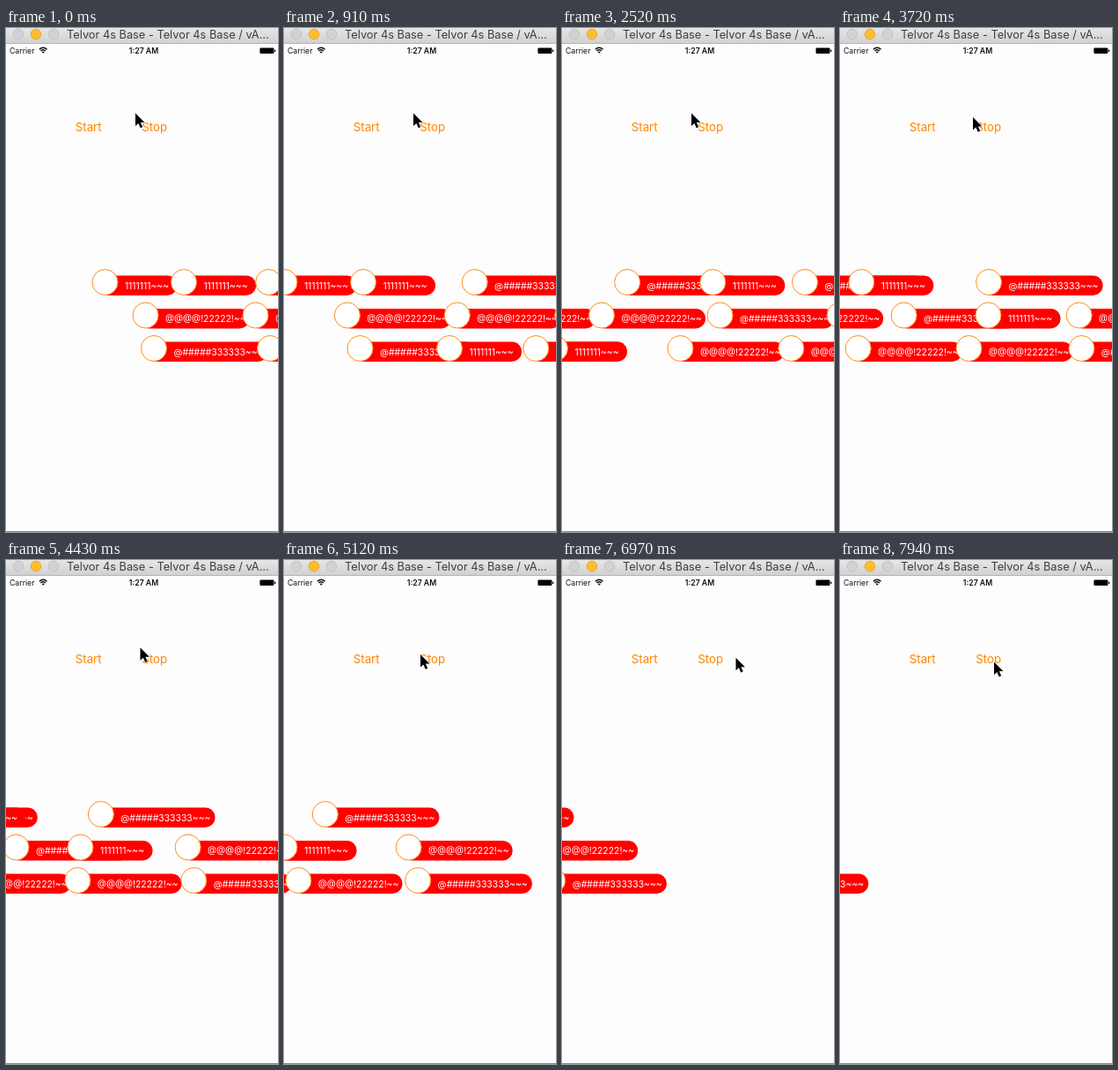
Write an HTML page that moves like this. It is 309 px wide and 571 px high and loops after 8 s.

```html
<!DOCTYPE html>
<html lang="en">
<head>
<meta charset="utf-8">
<title>Bullet comments</title>
<style>
  html, body { margin: 0; width: 100%; height: 100%; overflow: hidden; background: #fdfdfd; }
  svg { display: block; width: 309px; height: 571px; font-family: Inter, Roboto, sans-serif; }
  .button { font-size: 13.3px; fill: #ff8500; }
  .status { font-size: 8.7px; fill: #111; }
  .label { font-size: 10.4px; fill: #fff; }
</style>
</head>
<body>
<svg id="stage" viewBox="0 0 309 571">
  <defs>
    <linearGradient id="bar" x2="0" y2="1">
      <stop stop-color="#e6e6e6"/><stop offset="1" stop-color="#d1d1d1"/>
    </linearGradient>
  </defs>
  <rect width="309" height="571" fill="#fdfdfd"/>

  <!-- Window title bar -->
  <rect width="309" height="17" fill="url(#bar)"/>
  <rect y="17" width="309" height="1" fill="#b4b4b4"/>
  <g stroke-width=".8">
    <circle cx="14" cy="7" r="5.8" fill="#d2d2d2" stroke="#bdbdbd"/>
    <circle cx="34" cy="7" r="5.8" fill="#ffbd2e" stroke="#e2a02a"/>
    <circle cx="54" cy="7" r="5.8" fill="#d2d2d2" stroke="#bdbdbd"/>
  </g>
  <text x="69" y="12" font-size="12.8" fill="#3f3f3f">Telvor 4s Base - Telvor 4s Base / vA...</text>

  <!-- Status bar -->
  <text class="status" x="4" y="29">Carrier</text>
  <g fill="none" stroke="#111" stroke-width="1.4">
    <path d="M37.8 24.2Q42.2 20.2 46.6 24.2M39.4 26Q42.2 23.6 45 26"/>
    <path d="M40.6 27.2Q42.2 26 43.8 27.2L42.2 28.8Z" fill="#111" stroke="none"/>
  </g>
  <text class="status" x="156.5" y="29" text-anchor="middle" font-weight="600">1:27 AM</text>
  <rect x="288.4" y="22.4" width="16" height="6.6" rx="1.2" fill="#000"/>
  <rect x="305" y="24.4" width="1.2" height="2.6" rx=".6" fill="#000"/>

  <text class="button" x="78.7" y="116.6">Start</text>
  <text class="button" x="154.3" y="116.6">Stop</text>
  <g id="bullets"></g>
  <rect y="570" width="309" height="1" fill="#858585"/>
  <path id="cursor" d="M0 0V14.6L3.4 11.4L5.7 16.8L8.2 15.7L5.9 10.5H10.4Z"
        fill="#000" stroke="#fff" stroke-width="1.2" paint-order="stroke"/>
</svg>
<script>
const LOOP = 8000, LAST_TICK = 138;

// speed is in pixels per tick
const KINDS = {
  one:   { text: '1111111~~~',      width: 97,    speed: 7 },
  two:   { text: '@@@@!22222!~~',   width: 133,   speed: 5.42 },
  three: { text: '@#####333333~~~', width: 144.6, speed: 5.092 }
};

// Each lane lists [kind, left edge at tick 0]; later bullets overlap earlier ones
const LANES = [
  [['one', 97.5], ['one', 187], ['three', 283.2], ['one', 464.3], ['three', 485]],
  [['two', 143.6], ['two', 268.5], ['three', 388.6], ['one', 608.5], ['two', 609]],
  [['three', 153], ['one', 285], ['two', 358], ['two', 483.8], ['three', 590.4]]
];

// [ms, tick]: the picture advances in slightly uneven ticks
const TICKS = [[0, 0], [60, 1], [850, 15], [1710, 30], [3430, 60], [4200, 73],
  [5060, 88], [5880, 102], [6800, 118], [7650, 133], [LOOP, 139]];

// [tick, x, y] of the pointer tip
const POINTER = [[0, 147, 96.5], [59, 147, 96.5], [65, 151, 101], [73, 152, 98.5],
  [81, 153, 100], [89, 155, 107], [96, 178, 84.5], [102, 196, 89], [107, 201, 107],
  [117, 202, 108.5], [133, 184, 117], [138, 175, 115.5]];

function interpolate(knots, at, column = 1) {
  let i = 1;
  while (i < knots.length - 1 && knots[i][0] < at) i++;
  const a = knots[i - 1], b = knots[i];
  return a[column] + (b[column] - a[column]) * (at - a[0]) / (b[0] - a[0]);
}

function createBullet(kind, start, lane) {
  const { text, width, speed } = KINDS[kind];
  const node = document.createElementNS('http://www.w3.org/2000/svg', 'g');
  node.innerHTML =
    `<rect x="7.5" y="7.5" width="${width - 7.5}" height="22.4" rx="11.2" fill="#f00"/>
     <circle cx="15" cy="15" r="14.5" fill="#fff" stroke="#ff8c1a"/>
     <text class="label" x="37.4" y="22.5">${text}</text>`;
  document.getElementById('bullets').append(node);
  return { node, start, speed, y: 273 + lane * 37.5 };
}

const bullets = LANES.flatMap((lane, row) =>
  lane.map(([kind, start]) => createBullet(kind, start, row)));
const cursor = document.getElementById('cursor');

function place(node, x, y) {
  node.setAttribute('transform', `translate(${x.toFixed(2)} ${y})`);
}

function draw(now) {
  const tick = Math.min(LAST_TICK, Math.floor(interpolate(TICKS, now % LOOP) + 0.15));
  for (const { node, start, speed, y } of bullets) place(node, start - speed * tick, y);
  place(cursor, interpolate(POINTER, tick, 1), interpolate(POINTER, tick, 2));
  requestAnimationFrame(draw);
}
draw(performance.now());
</script>
</body>
</html>
```
